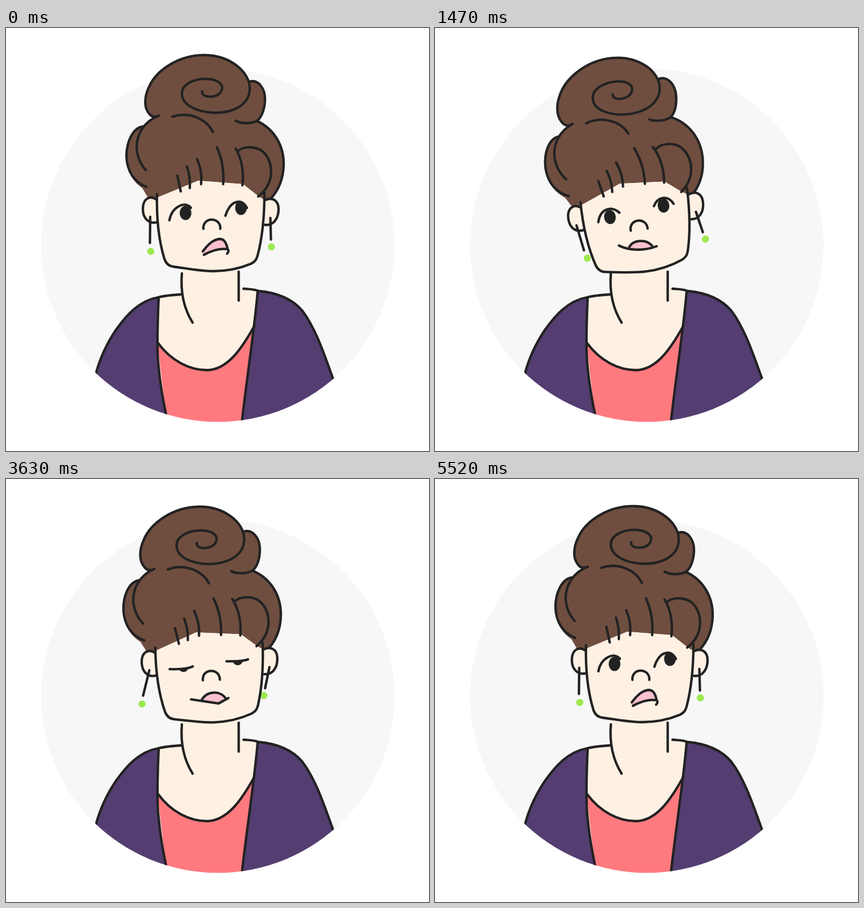
Animation of 748x748 px, one loop 6480 ms. Source, as an HTML page with a canvas:

```html
<!DOCTYPE html>
<html lang="en">
<head>
<meta charset="utf-8">
<title>Portrait</title>
<style>
html, body { margin: 0; width: 100%; height: 100%; overflow: hidden; background: #fff; }
canvas { display: block; width: 100vmin; height: 100vmin; }
</style>
</head>
<body>
<canvas id="stage" width="748" height="748"></canvas>
<script>
const ctx = document.getElementById('stage').getContext('2d');
const LOOP = 6480, STEP = 30;
const INK = '#222', SKIN = '#fef0e3', HAIR = '#6f4e3f', JACKET = '#543d70',
      SHIRT = '#ff7a7f', LIME = '#9de84f', PINK = '#fbc0cd';
const PIVOT = [375, 380];

const fill = (d, color) => { ctx.fillStyle = color; ctx.fill(new Path2D(d)); };
const line = d => ctx.stroke(new Path2D(d));
const disc = (x, y, rx, ry, color) => {
  ctx.fillStyle = color;
  ctx.beginPath();
  ctx.ellipse(x, y, rx, ry, 0, 0, 7);
  ctx.fill();
};
const turn = (degrees, x, y) => {
  ctx.translate(x, y);
  ctx.rotate(degrees * Math.PI / 180);
  ctx.translate(-x, -y);
};

// Eased value of a [time, value] track.
function track(keys, t) {
  if (t <= keys[0][0]) return keys[0][1];
  for (let i = 1; i < keys.length; i++) {
    const [t0, a] = keys[i - 1], [t1, b] = keys[i];
    if (t <= t1) {
      const u = (t - t0) / (t1 - t0);
      return a + (b - a) * u * u * (3 - 2 * u);
    }
  }
  return keys[keys.length - 1][1];
}

const TILT = [[1260, 0], [1560, -9], [1830, -6.2], [3390, -6.2], [3780, 0],
              [5100, 0], [5300, 2.1], [5510, 0]];
const SWAY = [[690, 0], [1140, .5], [1260, 0], [1440, -11], [1680, 8], [1860, 1.8], [1980, 4.3],
              [2310, 4], [3330, 4.4], [3420, 4.4], [3620, 15.5], [3760, -4], [3870, 0],
              [5110, 0], [5220, 7], [5400, -5], [5510, 0]];
// Start, fully closed, fully open again.
const BLINKS = [[240, 390, 570], [870, 1020, 1180], [2190, 2310, 2490],
                [3450, 3630, 3830], [5100, 5260, 5440]];

const openness = t => Math.min(...BLINKS.map(([a, b, c]) =>
  t <= a || t >= c ? 1 : t < b ? (b - t) / (b - a) : (t - b) / (c - b)));
const gazeAt = t => t < 1030 || t > 5265 ? 'right' : t < 3645 ? 'center' : 'left';
const mouthAt = t => t < 1400 || t > 5265 ? 'frown' : t < 3500 ? 'smile' : 'doubt';

// Upper lids as cubic curves.
const SHUT = [[291, 333, 303, 334, 320, 335, 332, 330], [392, 323, 404, 323, 420, 325, 430, 321]];
const EYES = {
  right: {
    lids: [[289, 340, 293, 316, 317, 305, 327, 318], [388, 332, 394, 309, 415, 297, 426, 318]],
    pupils: [[317.5, 327], [415.5, 318]]
  },
  center: {
    lids: [[294, 333, 300, 310, 320, 306, 333, 321], [395, 317, 403, 302, 421, 299, 430, 317]],
    pupils: [[315.5, 326.5], [412, 318]]
  },
  left: {
    lids: [[290, 320, 299, 307, 324, 312, 328, 340], [389, 319, 398, 299, 422, 304, 426, 332]],
    pupils: [[302, 327], [401, 318]]
  }
};

const BUN = 'C256 157 253 152 250 147 C243 134 247 116 253 104 C267 72 309 47 353 48 C398 49 432 79 431 108';
const BUMP = 'C446 90 459 107 458 128 C457 148 450 160 443 165';
const RIGHT_HAIR = 'C474 178 492 208 491 243 C490 268 482 287 468 302';
const FRINGE = 'L447 298 L419 276 L340 270 L267 300';
const JAW = 'C266 335 270 375 280 408 C283 417 288 421 296 422 C318 425 343 430 366 430 ' +
            'C392 430 416 424 433 417 C441 413 443 409 445 402 C455 364 457 325 457 292';
const NECKLINE = 'M268 556 C292 589 325 605 355 605 C392 605 418 565 439 527';
const LEFT_SHOULDER = 'C235 482 213 508 195 533 C178 558 166 585 159 611';
const RIGHT_SHOULDER = 'C480 468 507 480 524 500 C547 530 562 575 579 622';
const LEFT_LAPEL = 'M270 476 C268 520 266 570 270 600 C273 635 278 660 284 688';
const RIGHT_LAPEL = 'M445 465 C441 520 425 625 417 698';

const HAIR_LINES = [
  'M270 155 C267 157 266 157 263 157 ' + BUN + ' C430 135 404 150 369 150 C336 149 311 135 311 116 ' +
    'C311 99 333 89 356 90 C374 91 384 99 382 108 C380 118 368 123 356 121 C350 120 346 117 347 112',
  'M270 155 C245 165 231 187 231 211 C232 229 238 241 247 251',
  'M243 174 C225 176 213 200 213 227 C214 255 228 273 248 281',
  'M430 95 ' + BUMP + ' C430 170 415 169 406 164',
  'M443 164 ' + RIGHT_HAIR,
  'M411 217 C422 208 448 208 460 225 C473 244 474 276 446 298',
  'M406 213 C417 231 421 256 418 278',
  'M373 211 C382 231 386 252 384 276',
  'M338 232 C344 246 347 260 345 276',
  'M320 245 C324 257 326 270 325 283',
  'M303 261 L309 289',
  'M294 157 C323 147 354 160 366 184'
];

const MOUTHS = {
  frown: {
    tongue: 'M348 396 C357 383 366 374 378 373 C387 373 390 382 392 391 C376 389 363 394 350 401Z',
    lines: 'M348 395 C357 383 366 374 378 373 C387 373 390 382 392 391 ' +
           'M350 401 C365 393 378 389 390 391 C395 392 394 396 391 399'
  },
  smile: {
    tongue: 'M343 383 C351 372 374 372 383 386 L384 389 C370 392 356 391 341 386Z',
    lines: 'M325 378.6 C341 389 365 394 391 388 M343 383 C351 372 374 372 383 386'
  },
  doubt: {
    tongue: 'M345 391 C354 374 378 373 388 388 L375 397Z',
    lines: 'M327 388 L375 397 L393 388 M345 391 C354 374 378 373 388 388'
  }
};

function drawBody() {
  ctx.save();
  ctx.beginPath();
  ctx.arc(374.5, 384, 312.5, 0, 7);
  ctx.clip();
  fill('M0 0H748V748H0Z', '#f7f7f7');
  fill('M311 420 L311 471 L270 476 L268 620 L430 620 L445 465 L420 461 L411 461 L411 420Z', SKIN);
  fill(NECKLINE + ' L417 698 L284 698Z', SHIRT);
  fill(LEFT_LAPEL + ' L284 748 L100 748 L159 611 C166 585 178 558 195 533 C213 508 235 482 270 476Z', JACKET);
  fill('M445 465 ' + RIGHT_SHOULDER + ' L640 748 L410 748 L417 698 C425 625 441 520 445 465Z', JACKET);
  [NECKLINE, LEFT_LAPEL, RIGHT_LAPEL,
    'M311 471 C295 472 282 473 270 476 ' + LEFT_SHOULDER,
    'M420 461 C433 462 440 462 446 465 ' + RIGHT_SHOULDER,
    'M311 434 C308 470 315 497 330 521',
    'M411.5 431 V482'].forEach(line);
  ctx.restore();
}

function drawEarring(x, y, x2, y2, dotX, dotY, sway) {
  ctx.save();
  turn(sway, x, y);
  line(`M${x} ${y} L${x2} ${y2}`);
  disc(dotX, dotY, 6.3, 6.3, LIME);
  ctx.restore();
}

function drawEye(lid, shut, pupil, open) {
  const [x0, y0, x1, y1, x2, y2, x3, y3] = lid.map((v, i) => shut[i] + (v - shut[i]) * open);
  const curve = `M${x0} ${y0} C${x1} ${y1} ${x2} ${y2} ${x3} ${y3}`;
  ctx.save();
  ctx.clip(new Path2D(`${curve} H${x3 + 15} V${y3 + 50} H${x0 - 15} V${y0}Z`));
  disc(...pupil, 10.3, 12.6, INK);
  ctx.restore();
  line(curve);
}

function drawHead(t) {
  const sway = track(SWAY, t), open = openness(t);
  const eyes = EYES[gazeAt(t)], mouth = MOUTHS[mouthAt(t)];
  ctx.save();
  turn(track(TILT, t), ...PIVOT);

  fill('M251 300 L241 283 C222 270 213 250 213 227 C213 200 225 176 243 174 C250 165 258 160 263 157 ' +
    BUN + ' L430 95 ' + BUMP + ' ' + RIGHT_HAIR + ' L457 304 ' + FRINGE + 'Z', HAIR);

  for (const ear of ['M267 304 C255 295 242 301 242 320 C242 337 253 348 269 343',
                     'M459 304 C470 299 482 304 482 320 C482 339 471 350 458 348']) {
    fill(ear, SKIN);
    line(ear);
  }
  drawEarring(255, 334, 254.5, 380, 256, 395, sway);
  drawEarring(467.5, 336, 468.5, 374, 469.3, 387, sway);

  fill('M267 300 ' + JAW + ' L457 304 ' + FRINGE + 'Z', SKIN);
  line('M267 294 ' + JAW);
  HAIR_LINES.forEach(line);

  eyes.lids.forEach((lid, i) => drawEye(lid, SHUT[i], eyes.pupils[i], open));
  line('M349 355 C348 333 380 334 379 355');
  fill(mouth.tongue, PINK);
  line(mouth.lines);
  ctx.restore();
}

const start = performance.now();
function frame() {
  const t = Math.floor(((performance.now() - start) % LOOP) / STEP) * STEP;
  ctx.fillStyle = '#fff';
  ctx.fillRect(0, 0, 748, 748);
  ctx.strokeStyle = INK;
  ctx.lineWidth = 4.3;
  ctx.lineCap = ctx.lineJoin = 'round';
  drawBody();
  drawHead(t);
  requestAnimationFrame(frame);
}
frame();
</script>
</body>
</html>
```
